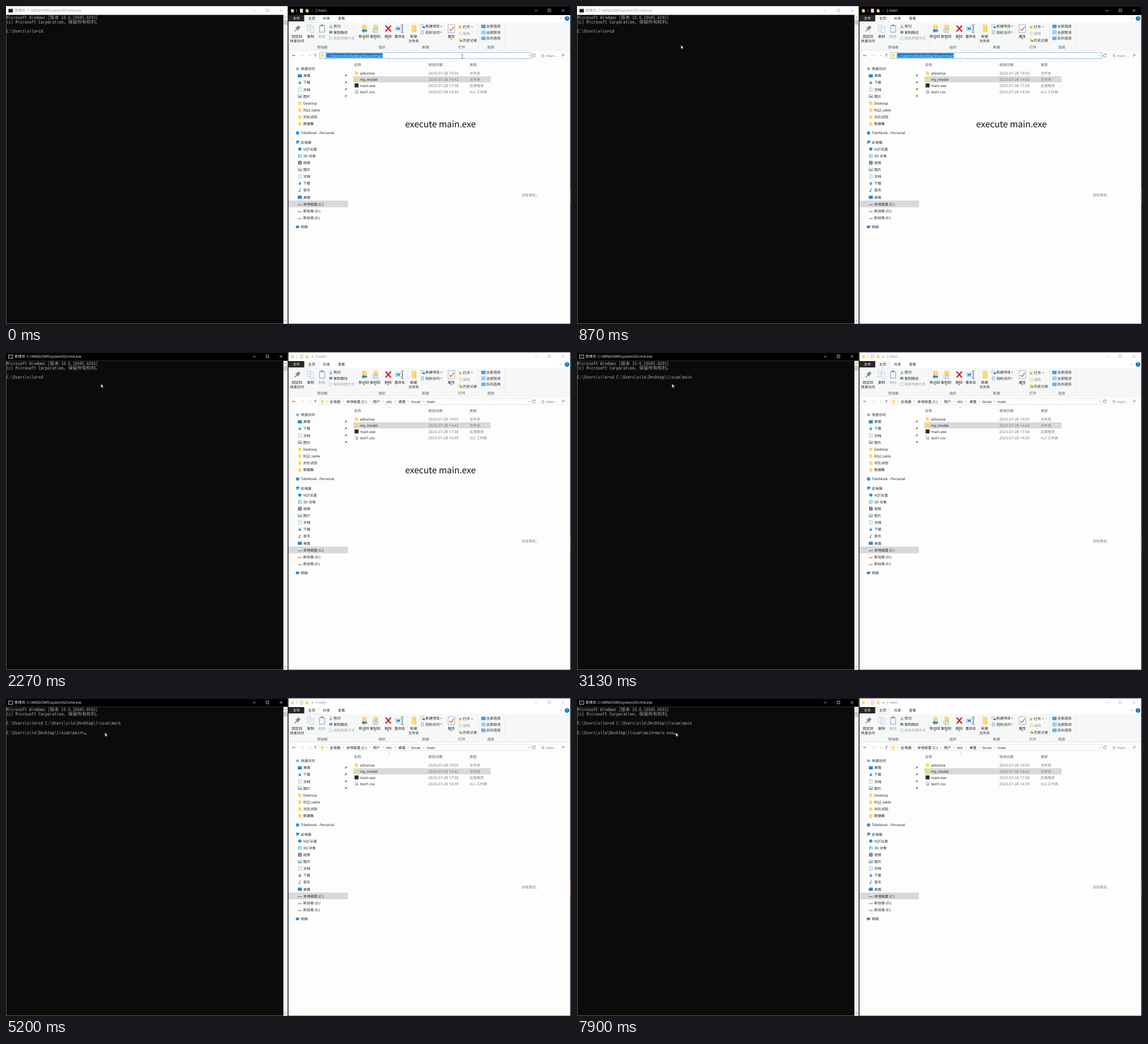
Animation of 998 by 561 pixels, one loop 8000 ms. Source, as an HTML page:

```html
<!DOCTYPE html>
<html lang="zh-CN">
<head>
<meta charset="utf-8">
<style>
html, body { margin: 0; width: 100%; height: 100%; overflow: hidden; background: #fff; }
svg { display: block; width: 100%; height: 100%; }
text { font: 6.24px "Noto Sans", "Noto Sans CJK SC", sans-serif; text-rendering: geometricPrecision; white-space: pre; }
.cmd text { font: 8.08px "Noto Sans Mono CJK SC", monospace; fill: #a8a8a8; }
.big { font: 500 15.5px "Noto Sans CJK SC", "Noto Sans", sans-serif; }
</style>
</head>
<body>
<svg id="stage" viewBox="0 0 998 561"></svg>
<script>
const INK = '#222', DIM = '#777', FADED = '#a3a3a3', BLUE = '#2b8fd6', GOLD = '#ffd970';

const rect = (x, y, w, h, fill, more = '') => `<rect x="${x}" y="${y}" width="${w}" height="${h}" fill="${fill}" ${more}/>`;
const path = (d, color, width = .8, more = '') => `<path d="${d}" fill="none" stroke="${color}" stroke-width="${width}" ${more}/>`;
const shape = (d, fill) => `<path d="${d}" fill="${fill}"/>`;
const dot = (x, y, r, fill) => `<circle cx="${x}" cy="${y}" r="${r}" fill="${fill}"/>`;
// y is the middle of the line
const text = (x, y, s, fill = INK, size = 6.24, anchor = 'start') =>
  `<text x="${x}" y="${y + 2.3}" fill="${fill}" style="font-size:${size}px" text-anchor="${anchor}">${s}</text>`;
const label = (x, y, s, fill = INK) => text(x, y, s, fill, 6.24, 'middle');
const down = (x, y, fill = '#555') => shape(`M${x - 1.5} ${y - .8}h3l-1.5 1.7z`, fill);
const chevron = (x, y) => path(`M${x - .8} ${y - 1.6}l1.6 1.6l-1.6 1.6`, '#777', .6);

const folder = (x, y, s = 1) =>
  shape(`M${x - 2.7 * s} ${y - 3.4 * s}h${2.4 * s}l${s} ${s}h${2 * s}v${5.8 * s}h${-5.4 * s}z`, GOLD) +
  rect(x - 2.7 * s, y - 1.2 * s, 5.4 * s, .5 * s, '#f2b93b');
const bigFolder = (x, y) => shape(`M${x - 4} ${y - 7}h6l2 2v11.5h-8z`, GOLD) + rect(x + 2.6, y - 5, 1.4, 11.5, '#f5c553');
const page = (x, y, w = 5, h = 6.5, stroke = '#9aa7b4') =>
  rect(x - w / 2, y - h / 2, w, h, '#fff', `stroke="${stroke}" stroke-width=".6"`) +
  path(`M${x - w / 4} ${y - h / 6}h${w / 2}m0 ${h / 3}h${-w / 2}`, stroke, .6);
const screen = (x, y) => rect(x - 3.5, y - 2.7, 7, 5.2, BLUE) + rect(x - 3.5, y + 1.3, 7, 1.2, '#1464a5');
const picture = (x, y) => rect(x - 3.5, y - 2.5, 7, 5, '#dcecf6', 'stroke="#8499aa" stroke-width=".6"') +
  shape(`M${x - 3} ${y + 2}l2.2 -2.6l1.5 1.3l1.2 -.8l1.6 2.1z`, '#4f90b7');
const arrowDown = (x, y) => path(`M${x} ${y - 3}v5.2m-2.4 -2.2l2.4 2.4l2.4 -2.4`, '#2381c9', 1.3);
const drive = (x, y) => rect(x - 3.5, y + .8, 7, 1.1, '#666') + rect(x - 3, y, 6, .8, '#d5d5d5');
const film = (x, y) => rect(x - 3, y - 3.2, 6, 6.4, '#555') + rect(x - 1.8, y - 2.4, 3.6, 2, '#aebbc5') + rect(x - 1.8, y + .4, 3.6, 2, '#aebbc5');
const note = (x, y) => path(`M${x} ${y + 2}v-5l2 1.8`, BLUE, .9) + dot(x - .9, y + 2, 1.3, BLUE);
const computer = (x, y) => rect(x - 2.5, y - 2.6, 5.6, 3.8, BLUE) + rect(x - 3, y + 1.9, 4, .8, '#777');
const globe = (x, y) => dot(x - .8, y, 2.5, BLUE) + rect(x, y - 2, 3, 3, '#4d6f90');
const box3d = (x, y) => rect(x - 3, y - 2.7, 6, 5.6, '#58c1d6') + rect(x - 1.2, y - 1.1, 3.2, 3, '#e4f6fa');
const star = (x, y) => path(`M${x - 3} ${y}h6m-3 -3v6m-2 -5l4 4m0 -4l-4 4`, '#3e9bdc', 1);
const pin = (x, y, s = 1, c = '#777') =>
  path(`M${x - 2 * s} ${y + 2 * s}l${1.8 * s} ${-1.8 * s}`, c, .7 * s) + shape(`M${x - 1.5 * s} ${y - .8 * s}l${2.3 * s} ${2.3 * s}l${.5 * s} ${-1.3 * s}l${1.2 * s} ${-1.2 * s}l${-1.6 * s} ${-1.6 * s}l${-1.2 * s} ${1.3 * s}z`, c);
const disc = (x, y) => dot(x, y, 2.9, BLUE);

function titleButtons(x, fill) {
  return path(`M${x} 8.2h5m18.5 -2.7h4.6v4.6h-4.6zm24.2 .2l4.4 4.4m0 -4.4l-4.4 4.4`, fill, .7);
}

function cmdTitle(active) {
  const ink = active ? '#f2f2f2' : '#949494';
  return rect(0, 0, 497.5, 15.5, active ? '#000' : '#fff') + rect(0, 0, 497.5, .8, active ? '#333' : '#aaa') +
    rect(4.5, 5.2, 7.5, 6, '#161616', `stroke="${active ? '#ddd' : '#777'}" stroke-width=".8"`) +
    text(15, 8, '管理员: C:\\WINDOWS\\system32\\cmd.exe', ink, 6.24) + titleButtons(436, active ? '#eee' : '#aaa');
}

function explorerTitle(active) {
  const ink = active ? '#f2f2f2' : '#888';
  return rect(499, 0, 498, 16, active ? '#000' : '#fff') + rect(499, 0, 498, .7, '#333') +
    folder(506, 8.3, .9) + path('M513.5 5.5v5.5', ink, .5) +
    rect(519.3, 5, 5, 6.5, '#fff', 'stroke="#999" stroke-width=".5"') + path('M520.4 8.3l1.2 1.3l2 -2.8', '#c33', .6) +
    folder(532, 8.3, .9) + down(541, 8.5, active ? '#888' : '#444') + path('M548 5v6.5', ink, .6) +
    text(551, 8, 'main', ink, 6.4) + titleButtons(934, active ? '#eee' : '#aaa');
}

function ribbon() {
  let s = rect(499, 16, 498, 12, '#fff') + rect(499, 28, 498, 50, '#f6f7f7') + rect(499, 77.6, 498, .6, '#dcdcdc') +
    rect(499, 15.6, 28, 11.6, '#262626') + label(513, 21.7, '文件', '#fff') +
    rect(527, 16, 26, 12.5, '#f6f7f7', 'stroke="#e1e1e1" stroke-width=".5"') +
    label(540, 21.7, '主页') + label(566, 21.7, '共享') + label(592.5, 21.7, '查看') +
    path('M978 22.8l2 -2l2 2', '#777', .6) + dot(991, 22, 4, '#1477b8') + label(991, 22, '?', '#fff');
  for (const x of [620, 709, 772, 834, 880]) s += rect(x, 31, .5, 44, '#e2e3e4');
  for (const [x, a] of [[559, '剪贴板'], [664, '组织'], [741, '新建'], [805, '打开'], [856, '选择']]) s += label(x, 73, a, '#555');
  for (const [x, y, a, c] of [
    [514, 53.5, '固定到'], [514, 61.3, '快速访问'], [538, 53.5, '复制'], [558, 53.5, '粘贴', FADED],
    [632, 53.5, '移动到'], [652, 53.5, '复制到'], [675, 53.5, '删除'], [695.5, 53.5, '重命名'],
    [720, 53.5, '新建'], [720, 61.3, '文件夹'], [786.5, 53.5, '属性']]) s += label(x, y, a, c);
  for (const [x, y, a, c] of [
    [578.5, 36, '剪切'], [578.5, 46.3, '复制路径'], [578.5, 57, '粘贴快捷方式', FADED],
    [741, 36, '新建项目'], [741, 46.3, '轻松访问'], [807, 37, '打开'], [807, 48.5, '编辑', FADED],
    [807, 60.3, '历史记录'], [848.5, 36, '全部选择'], [848.5, 46.3, '全部取消'], [848.5, 57, '反向选择']]) s += text(x, y, a, c);
  for (const [x, y] of [[632, 58], [652, 58], [675, 58], [786.5, 58], [768.5, 36], [768.5, 46.3], [823, 37]]) s += down(x, y);

  s += pin(514.5, 40, 2.3, '#858b90') + page(535.5, 38.5, 6.5, 10, '#8eb1cf') + page(540.5, 41.5, 6.5, 10, '#8eb1cf');
  s += rect(553, 34, 10.5, 13, '#a6bacb') + rect(554.5, 35.5, 7.5, 10, '#f4f8fa') + rect(556, 32.8, 4.5, 2.4, '#718799');
  s += path('M572 33l3.5 4m0 -4l-3.5 4', '#64819a', .7) + dot(572.3, 38, 1, BLUE) + dot(575.3, 38, 1, BLUE);
  s += rect(571, 44, 5.5, 4.5, '#6795b7') + page(573.5, 57, 5, 5.5, '#b6bcc2');
  s += bigFolder(633, 40) + shape('M628 43.5l4.2 -3.8v2.3h5.5v3h-5.5v2.3z', '#268ad0');
  s += bigFolder(653, 40) + page(650.5, 43, 5, 6, '#5fa0d0') + page(654, 44.5, 5, 6, '#5fa0d0');
  s += path('M670.5 34.5l9.5 10.5m0 -10.5l-9.5 10.5', '#d32434', 2.5);
  s += rect(688.5, 37, 12, 6, '#eef6fb', 'stroke="#7897ae" stroke-width=".7"') + rect(690, 38.5, 6, 3, '#248bd1') +
    path('M697.5 33.5h5m-2.5 0v13m-2.5 0h5', '#555', .8);
  s += bigFolder(720.5, 40);
  s += page(735, 35, 4.5, 5) + rect(736, 36, 4, 3, BLUE) + page(735.5, 46.5, 4.5, 5.5, '#4d8fc0');
  s += rect(781, 33, 11.5, 14, '#fff', 'stroke="#8f9da8" stroke-width=".8"') + path('M783.5 40.5l2.5 3l5 -7', '#d85246', 1.3);
  s += folder(802, 37, .9) + path('M801 39l3.5 -3', BLUE, 1) + page(802.5, 48.5, 4.5, 5, '#b8bec3') +
    folder(802, 60, .9) + dot(804, 61.5, 1.7, '#58a05d');
  for (const [y, fill] of [[35.5, BLUE], [46, '#fff'], [56.5, '#91c7ea']])
    for (const dx of [0, 3.8]) for (const dy of [-2.2, 1]) s += rect(840 + dx, y + dy, 3, 2.3, fill, `stroke="${BLUE}" stroke-width=".6"`);
  return s;
}

function addressBar() {
  return path('M511.5 87.3h-5.5m2 -2l-2 2l2 2', '#555', .7) + path('M520.5 87.3h5.5m-2 -2l2 2l-2 2', '#ccc', .7) +
    path('M534.8 86.6l1.5 1.5l1.5 -1.5', '#777', .6) + path('M546.5 90v-5.4m-2 2l2 -2l2 2', '#555', .7) +
    folder(559, 87.3, .9) + path('M921.5 86.4l1.7 1.7l1.7 -1.7', '#666', .6) +
    path('M934.4 85.6a2.6 2.6 0 1 0 .6 2.2m-.4 -3.6v1.7h-1.7', '#555', .7) +
    rect(942, 82, 50, 11, '#fff', 'stroke="#e0e0e0" stroke-width=".5"') + text(945.5, 87.2, '在 main ...', DIM, 6.3) +
    `<circle cx="984.5" cy="86.3" r="1.7" fill="none" stroke="#666" stroke-width=".7"/>` + path('M983.3 87.6l-2 2', '#666', .8);
}

const addressBox = stroke => rect(554, 82, 373.5, 10.8, 'none', `stroke="${stroke}" stroke-width=".7"`);
const typedAddress = () => addressBox('#5c9dc9') + rect(565, 83.3, 100.5, 8, '#0876d1') +
  text(565.5, 87.2, 'C:\\Users\\vilo\\Desktop\\liscan\\main', '#fff', 6.3);

function crumbs() {
  const parts = [[572, '此电脑'], [601, '本地磁盘 (C:)'], [648, '用户'], [671, 'vilo'], [693, '桌面'], [716, 'liscan'], [743, 'main']];
  return addressBox('#dcdcdc') + parts.map(([x, a]) => chevron(x - 5.3, 87.3) + text(x, 87.2, a, INK, 6.3)).join('');
}

function sidebar() {
  const items = [
    [110.8, '快速访问', star, 0], [123, '桌面', screen, 1], [135, '下载', arrowDown, 1], [147.2, '文档', page, 1], [159.2, '图片', picture, 1],
    [171.4, 'Desktop', folder], [183.6, 'RQ2_table', folder], [195.8, '对比试验', folder], [208, '数据集', folder],
    [224, 'TideNook - Personal', disc, 0], [240.2, '此电脑', computer, 0], [252.3, 'VQT云盘', disc], [264.5, '3D 对象', box3d],
    [276.5, '视频', film], [288.6, '图片', picture], [300.8, '文档', page], [312.8, '下载', arrowDown], [325, '音乐', note],
    [337.2, '桌面', screen], [349.3, '本地磁盘 (C:)', drive], [361.5, '新加卷 (D:)', drive], [373.7, '新加卷 (E:)', drive], [389.7, '网络', globe, 0]];
  return rect(499, 343.2, 105, 12, '#d9d9d9') + items.map(([y, a, icon, kind]) => {
    const x = kind === 0 ? 515 : 519;
    return icon(x, y) + text(x + (kind === 0 ? 5.8 : 6), y, a) + (kind === 1 ? pin(600, y) : '');
  }).join('');
}

function files() {
  const rows = [
    ['ailicense', '19:55', '文件夹', folder], ['my_model', '14:42', '文件夹', folder],
    ['main.exe', '17:58', '应用程序', (x, y) => rect(x - 3.3, y - 3.8, 7, 7, '#262c31')],
    ['test1.csv', '14:39', 'XLS 工作表', (x, y) => page(x, y) + rect(x - .5, y - .5, 3, 2.8, '#79b18d')]];
  return text(614.8, 103.2, '名称', '#555') + text(746, 103.2, '修改日期', '#555') + text(819, 103.2, '类型', '#555') +
    path('M675.2 98.6l1.8 -1.5l1.8 1.5', '#777', .5) + path('M743 97v11.5M816 97v11.5M856 97v11.5', '#ececec', .5) +
    rect(613.5, 124, 242.5, 10.8, '#d9d9d9') +
    rows.map(([name, hour, kind, icon], i) => {
      const y = 118.4 + i * 11;
      return icon(619, y) + text(625.3, y, name, INK, 6.4) + text(746, y, '2025-07-28 ' + hour, DIM, 6.65) + text(819, y, kind, DIM);
    }).join('') + text(910.7, 333.7, '没有预览。', DIM);
}

const rowY = [22.7, 31.1, 47.3, 63.6];
const line = (i, s, id = '') => `<text x=".7" y="${rowY[i]}" id="${id}">${s}</text>`;

const stage = document.getElementById('stage');
stage.innerHTML =
  rect(0, 0, 998, 561, '#fdfefc') + rect(.4, 15.4, 490, 545.2, '#0a0c09', 'stroke="#555" stroke-width=".8"') +
  rect(490, 560.3, 508, .7, '#555') + rect(490, 15.5, 7.5, 545, '#f1f1f1') + rect(490.4, 24.5, 6.6, 8.5, '#c9c9c9') +
  path('M491.8 21l1.9 -1.9l1.9 1.9m-3.8 533l1.9 1.9l1.9 -1.9', '#666', .7) +
  `<g class="cmd">${line(0, 'Microsoft Windows [版本 10.0.19045.6093]')}${line(1, '(c) Microsoft Corporation。保留所有权利。')}` +
  `${line(2, '', 'first')}${line(3, '', 'second')}</g>` + rect(0, 0, 4, 1, '#ddd', 'id="caret"') +
  ribbon() + addressBar() + sidebar() + files() +
  `<g id="before">${cmdTitle(false)}${explorerTitle(true)}${typedAddress()}</g>` +
  `<g id="after">${cmdTitle(true)}${explorerTitle(false)}${crumbs()}</g>` +
  `<text class="big" id="caption" x="705" y="214.3" fill="#111">execute main.exe</text>` +
  rect(497.5, 0, 1.5, 561, '#151515') + rect(996.6, 0, 1.4, 561, '#20242a') + rect(996.8, 322, 1.2, 28, '#7a5549') +
  `<g id="beam">${path('M-1.2 -3.5h2.4m-1.2 0v7m-1.2 0h2.4', '#444', .7)}</g>` +
  `<path id="arrow" d="M0 0V6.7L1.6 5.3L2.6 7.6L3.7 7.1L2.7 4.9H4.8Z" fill="#fff" stroke="#222" stroke-width=".6"/>`;

const el = {};
for (const id of ['first', 'second', 'caret', 'before', 'after', 'caption', 'beam', 'arrow']) el[id] = document.getElementById(id);

const LOOP = 8000, SWITCH = 900, CAPTION_END = 2500, PASTE = 2600, ENTER = 4070, CELL = 4.04;
const HOME = 'C:\\Users\\vilo', TARGET = HOME + '\\Desktop\\liscan\\main';
const keys = [5830, 6000, 6130, 6270, 7270, 7370, 7630, 7830];
// moments when the caret turns on and off
const blinks = [[1540, 2070], [2600, 3130], [3660, 4670], [5200, 5730], [5830, 6770], [7270, 8000]];
const mouse = [[0, 806, 89], [130, 800, 90], [470, 671, 109], [860, 184, 69], [1070, 178, 66.2], [1500, 175, 64],
  [1670, 163.5, 60], [1700, 163.5, 60], [1770, 167.8, 56.2], [3385, 167.8, 56.2], [3430, 174.8, 61], [LOOP, 174.8, 61]];

function along(points, t) {
  const i = Math.max(1, points.findIndex(p => p[0] > t));
  const [a, b] = [points[i - 1], points[i]], k = (t - a[0]) / (b[0] - a[0]);
  return [a[1] + (b[1] - a[1]) * k, a[2] + (b[2] - a[2]) * k];
}
const show = (node, on) => node.setAttribute('visibility', on ? 'visible' : 'hidden');

function draw(now) {
  const t = now % LOOP;
  const first = HOME + '>cd ' + (t >= PASTE ? TARGET : '');
  const second = t >= ENTER ? TARGET + '>' + 'main.exe'.slice(0, keys.filter(k => k <= t).length) : '';
  el.first.textContent = first;
  el.second.textContent = second;
  el.caret.setAttribute('x', .7 + CELL * (second || first).length);
  el.caret.setAttribute('y', second ? 62.8 : 46.5);
  show(el.caret, blinks.some(([on, off]) => t >= on && t < off));
  show(el.before, t < SWITCH);
  show(el.after, t >= SWITCH);
  show(el.caption, t < CAPTION_END);
  const [x, y] = along(mouse, t);
  show(el.beam, t < 230);
  show(el.arrow, t >= 230);
  for (const p of [el.beam, el.arrow]) p.setAttribute('transform', `translate(${x} ${y})`);
}

function tick() {
  draw(performance.now());
  requestAnimationFrame(tick);
}
tick();
</script>
</body>
</html>
```
